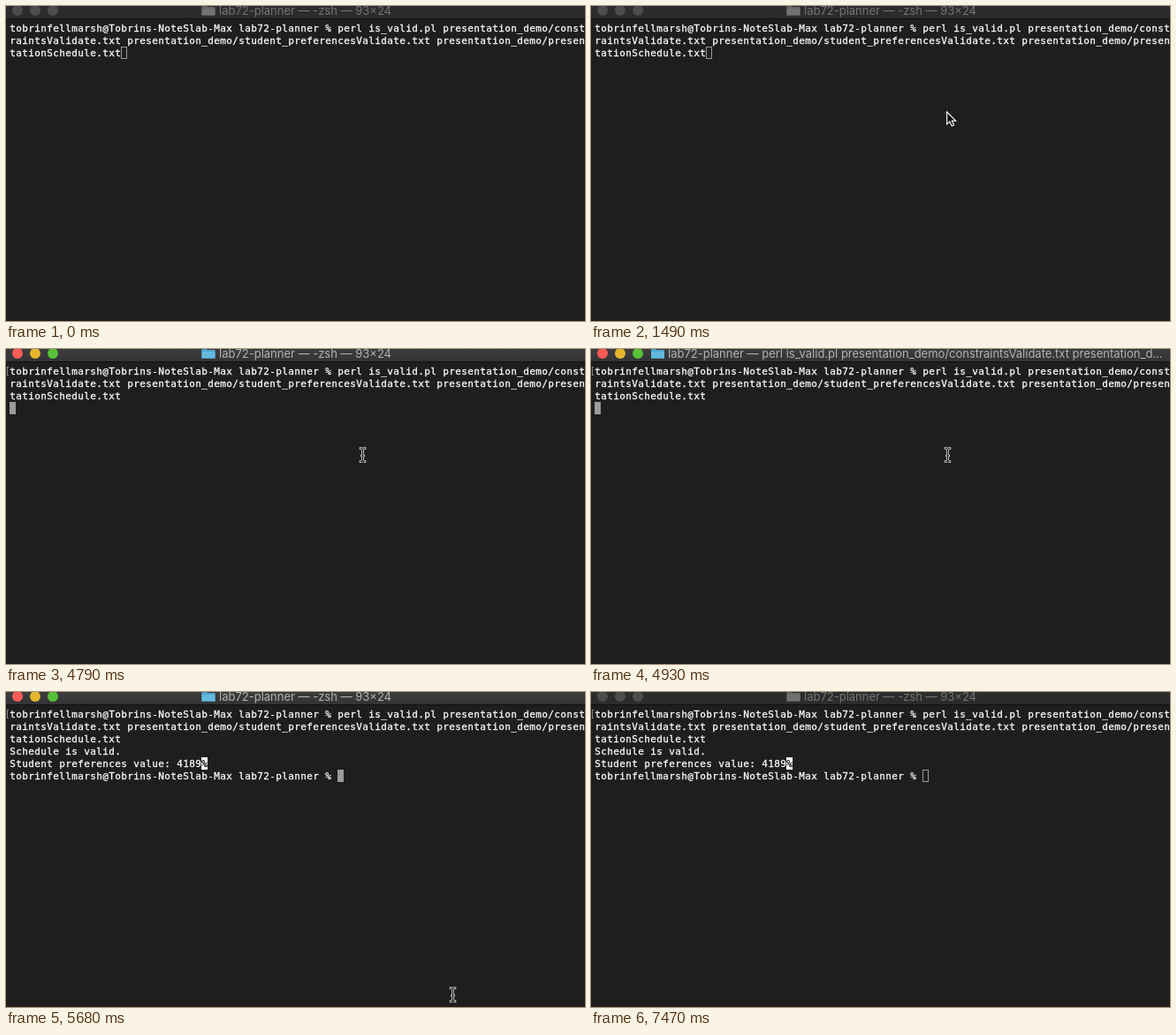
An HTML page with a canvas that plays this animation: 655 by 357 pixels, repeating every 7.57 s.

```html
<!DOCTYPE html>
<html lang="en">
<head>
<meta charset="utf-8">
<title>Terminal</title>
<style>
  html, body { margin: 0; width: 100%; height: 100%; overflow: hidden; background: #1e1e1e; }
  canvas { display: block; width: 655px; height: 357px; }
</style>
</head>
<body>
<canvas id="stage" width="655" height="357"></canvas>
<script>
const W = 655, H = 357, LOOP = 7570;
const CELL = 7, LINE = 14, LEFT = 4, TOP = 18;
const MONO = '11px "DejaVu Sans Mono", "Liberation Mono", monospace';
const SANS = '13px Inter, Roboto, sans-serif';

const ctx = document.getElementById('stage').getContext('2d');

const folder = 'lab72-planner';
const prompt = `tobrinfellmarsh@Tobrins-NoteSlab-Max ${folder} % `;
const command = 'perl is_valid.pl presentation_demo/constraintsValidate.txt ' +
  'presentation_demo/student_preferencesValidate.txt presentation_demo/presentationSchedule.txt';
const typed = (prompt + command).match(/.{1,93}/g);
const output = ['Schedule is valid.', 'Student preferences value: 4189'];

const FOCUS = 1640, ENTER = 4790, BUSY = 4930, DONE = 5080, BLUR = 7470;

// Pointer positions: start time, kind, x, y
const pointer = [
  [0], [450, arrow, 488, 271], [750, arrow, 456, 191], [890, arrow, 428, 155],
  [1340, arrow, 427, 147], [1490, arrow, 402, 119], [1640, beam, 403.5, 120],
  [5530, beam, 429.5, 190], [5680, beam, 505.5, 343], [5820, beam, 585.5, 349],
  [5970, beam, 608.5, 355], [6120]
];

function box(x, y, w, h, color) {
  ctx.fillStyle = color;
  ctx.fillRect(x, y, w, h);
}

function text(str, x, y, color, align = 'left') {
  ctx.font = SANS;
  ctx.fillStyle = color;
  ctx.textAlign = align;
  ctx.fillText(str, x, y);
}

// One glyph per terminal cell, with a hairline stroke for a medium weight
function cells(str, col, n, color) {
  ctx.font = MONO;
  ctx.fillStyle = ctx.strokeStyle = color;
  ctx.lineWidth = 0.3;
  ctx.textAlign = 'center';
  [...str].forEach((ch, i) => {
    const x = LEFT + (col + i + 0.5) * CELL, y = TOP + n * LINE + 11;
    ctx.fillText(ch, x, y);
    ctx.strokeText(ch, x, y);
  });
}

function row(str, n) {
  cells(str, 0, n, '#fafafa');
}

function caret(col, n, solid) {
  const x = LEFT + col * CELL, y = TOP + n * LINE;
  if (solid) return box(x, y, CELL, LINE, '#9a9a9a');
  ctx.strokeStyle = '#9a9a9a';
  ctx.lineWidth = 1;
  ctx.strokeRect(x + 0.5, y + 0.5, CELL - 1, LINE - 1);
}

function folderIcon(x, active) {
  box(x, 0, 6, 3, active ? '#4796bd' : '#606061');
  box(x, 1, 15, 9.5, active ? '#4fa5cf' : '#666667');
  box(x, 3, 15, 7.5, active ? '#64b9df' : '#727273');
}

function clip(str, width) {
  ctx.font = SANS;
  if (ctx.measureText(str).width <= width) return str;
  while (ctx.measureText(str + '…').width > width) str = str.slice(0, -1);
  return str + '…';
}

function titleBar(active, busy) {
  const fill = ctx.createLinearGradient(0, 0, 0, 14);
  fill.addColorStop(0, active ? '#3c3c3e' : '#2c2d2f');
  fill.addColorStop(1, active ? '#343436' : '#2a2b2d');
  box(0, 0, W, 14, fill);
  box(0, 14, W, 1, '#101010');

  ['#fc5b57', '#e5b52d', '#57c038'].forEach((color, i) => {
    ctx.fillStyle = active ? color : '#4c4c4e';
    ctx.beginPath();
    ctx.arc(13 + i * 20, 5, 6, 0, Math.PI * 2);
    ctx.fill();
  });

  const ink = active ? '#b3b3b4' : '#737475';
  if (busy) {
    folderIcon(68, active);
    text(clip(`${folder} — ${command} — 93×24`, 561), 87, 10, ink);
  } else {
    folderIcon(221.5, active);
    text(folder, 241, 10, ink);
    text('— -zsh — 93×24', 436, 10, ink, 'right');
  }
}

function arrow(x, y) {
  const p = new Path2D('M.6 1V15L3.9 12L6.2 17L8.6 16L6.4 11.2H10.6Z');
  ctx.save();
  ctx.translate(x, y);
  ctx.fillStyle = '#111';
  ctx.fill(p);
  ctx.strokeStyle = '#f4f4f4';
  ctx.lineWidth = 1.2;
  ctx.stroke(p);
  ctx.restore();
}

function beam(x, y) {
  const p = new Path2D('M-2.4-7.5Q0-7.5 0-5.5Q0-7.5 2.4-7.5M0-5.5V5.5M-2.4 7.5Q0 7.5 0 5.5Q0 7.5 2.4 7.5M-1 1H1');
  ctx.save();
  ctx.translate(x, y);
  ctx.lineCap = 'square';
  for (const [width, color] of [[2.6, '#ededed'], [1.1, '#151515']]) {
    ctx.lineWidth = width;
    ctx.strokeStyle = color;
    ctx.stroke(p);
  }
  ctx.restore();
}

function draw(t) {
  const active = t >= FOCUS && t < BLUR;
  box(0, 0, W, H, '#1e1e1e');
  titleBar(active, t >= BUSY && t < DONE);

  typed.forEach(row);
  if (t >= ENTER) {
    box(1, 20, 1, 10, '#858585');
    box(1, 20, 2, 1, '#858585');
    box(1, 29, 2, 1, '#858585');
  }

  if (t < ENTER) {
    caret(typed[2].length, 2, active);
  } else if (t < DONE) {
    caret(0, 3, active);
  } else {
    output.forEach((str, i) => row(str, i + 3));
    const end = output[1].length;
    box(LEFT + end * CELL, TOP + 4 * LINE, CELL, LINE, '#fff');
    cells('%', end, 4, '#111');
    row(prompt, 5);
    caret(prompt.length, 5, active);
  }

  const [, shape, x, y] = pointer.filter(p => p[0] <= t).pop();
  if (shape) shape(x, y);
}

let start;
function tick(now) {
  start ??= now;
  draw(Math.max(0, now - start) % LOOP);
  requestAnimationFrame(tick);
}
requestAnimationFrame(tick);
</script>
</body>
</html>
```
